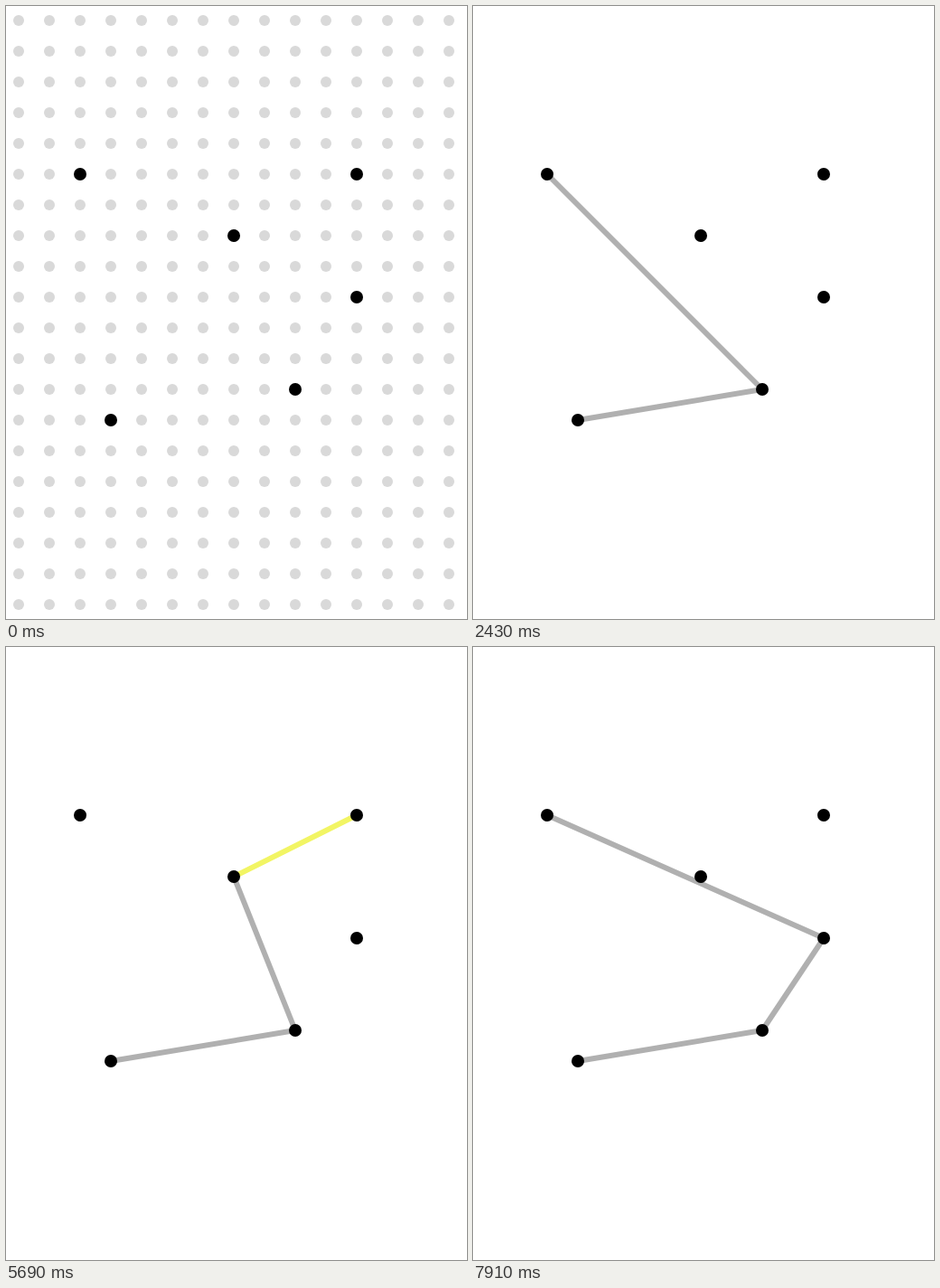
These frames come from a looping animation (510 by 678 pixels, 8000 ms). An HTML page:

```html
<!DOCTYPE html>
<html lang="en">
<head>
<meta charset="utf-8">
<title>Tour search</title>
<style>
  html, body { margin: 0; width: 100%; height: 100%; overflow: hidden; background: #fff; }
  svg { display: block; width: 510px; height: 678px; }
  #grid { fill: #d9d9d9; }
  #edges line { stroke: #000; stroke-opacity: .31; stroke-width: 6; }
  #edges line.fresh { stroke: #f2f564; stroke-opacity: 1; }
</style>
</head>
<body>
<svg viewBox="0 0 510 678">
  <g id="grid"></g>
  <g id="edges"></g>
  <g id="cities"></g>
</svg>
<script>
const LOOP = 8000, GRID_END = 280;

const cities = {
  A: [82, 186], B: [388, 186], C: [252, 254],
  D: [388, 322], E: [320, 424], F: [116, 458]
};

// Depth-first search: a letter extends the path, "-" steps back.
// Each burst is [first step, last step, moves], with even steps between.
const bursts = [
  [330, 330, 'E'], [470, 550, 'AC'], [690, 880, 'DBF'], [1020, 1220, '---'],
  [1360, 1770, 'BDF--'], [1910, 2100, '--D'], [2240, 2430, '-B-'],
  [2580, 2770, '-CA'], [2910, 3100, 'DBF'], [3250, 3440, '---'],
  [3590, 3780, 'BDF'], [3920, 4320, '----D'], [4460, 4660, 'AB-'],
  [4800, 4990, '-BA'], [5130, 5320, 'F--'], [5460, 5550, '--'],
  [5690, 5880, 'BAD'], [6030, 6220, '--D'], [6360, 6650, 'A---'],
  [6790, 6870, '-D'], [7010, 7110, 'AC'], [7250, 7440, 'BF-'],
  [7590, 7910, '--B-']
];

const states = [{ at: 0, path: 'F', fresh: false }];
for (const [first, last, moves] of bursts) {
  [...moves].forEach((move, i) => {
    const { path } = states[states.length - 1];
    const back = move === '-';
    states.push({
      at: first + (last - first) * i / Math.max(1, moves.length - 1),
      path: back ? path.slice(0, -1) : path + move,
      fresh: !back
    });
  });
}

const grid = document.getElementById('grid');
const edges = document.getElementById('edges');

function add(parent, tag, attrs) {
  const el = document.createElementNS('http://www.w3.org/2000/svg', tag);
  for (const key in attrs) el.setAttribute(key, attrs[key]);
  parent.append(el);
}

function drawPath({ path, fresh }) {
  edges.replaceChildren();
  for (let i = 1; i < path.length; i++) {
    const [x1, y1] = cities[path[i - 1]];
    const [x2, y2] = cities[path[i]];
    const isFresh = fresh && i === path.length - 1;
    add(edges, 'line', { x1, y1, x2, y2, class: isFresh ? 'fresh' : '' });
  }
}

for (let row = 0; row < 20; row++)
  for (let col = 0; col < 15; col++)
    add(grid, 'circle', { cx: 14 + 34 * col, cy: 16 + 34 * row, r: 6 });

for (const [cx, cy] of Object.values(cities))
  add(document.getElementById('cities'), 'circle', { cx, cy, r: 7 });

let shown;
function render() {
  const t = performance.now() % LOOP;
  grid.style.display = t < GRID_END ? '' : 'none';
  const state = states.findLast(s => s.at <= t);
  if (state !== shown) drawPath(shown = state);
  requestAnimationFrame(render);
}
render();
</script>
</body>
</html>
```
